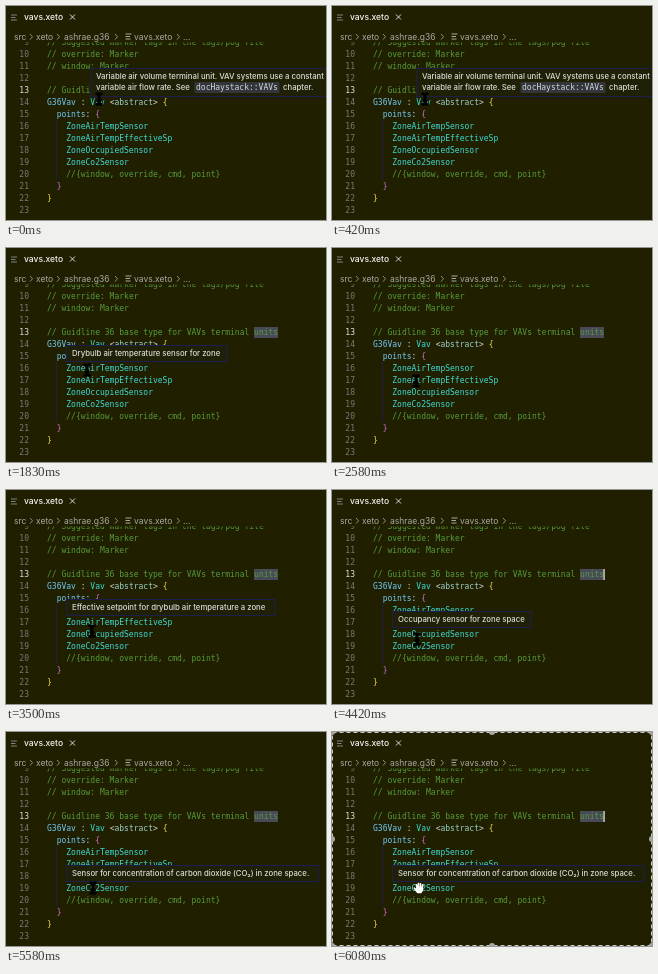
Write an HTML page that moves like this. It is 320x214 px and loops after 6160 ms.

```html
<!DOCTYPE html>
<html lang="en">
<head>
<meta charset="utf-8">
<title>Hovering types in an editor</title>
<style>
  html, body { margin: 0; width: 100%; height: 100%; overflow: hidden; background: #202000; }
  svg { display: block; width: 100vw; height: 100vh; }
  text { white-space: pre; }
  .code { font: 8px "DejaVu Sans Mono", monospace; }
  .ui { font: 8.5px Inter, sans-serif; fill: #a8a8a4; }
  .tip { font: 500 7.75px Inter, sans-serif; fill: #dcdcd8; }
  .box { fill: #202006; stroke: #1e1e4c; stroke-width: 1; }
</style>
</head>
<body>
<svg id="stage" viewBox="0 0 320 214">
  <defs><clipPath id="editor"><rect y="36.5" width="320" height="178"/></clipPath></defs>
  <rect width="320" height="214" fill="#202000"/>
  <g id="lines" clip-path="url(#editor)"></g>
  <rect id="caret" x="271.5" y="79" width="1.2" height="11" fill="#e8e8e8"/>
  <g id="header">
    <path d="M5 9h6M5 11.5h4.5M5 14h6" stroke="#7c8080"/>
    <path d="M64 8.5l5 5m0-5l-5 5" stroke="#d8d8d8"/>
    <path d="M119.5 28h6M119.5 30.5h4.5M119.5 33h5" stroke="#a8a8a4"/>
    <path id="chevrons" fill="none" stroke="#a8a8a4" stroke-width=".8"/>
  </g>
  <g id="tips"></g>
  <g id="selection">
    <rect x=".5" y=".5" width="319" height="213" fill="none" stroke="#c8c8c0" stroke-dasharray="4 3"/>
    <g id="handles" fill="#a8a8a4"></g>
  </g>
  <g id="mouse">
    <g id="beam" fill="none" stroke-linecap="round">
      <path id="beamShape" d="M-2.3-5.3Q0-5.3 0-3.8Q0-5.3 2.3-5.3M0-4V4M-2.3 5.3Q0 5.3 0 3.8Q0 5.3 2.3 5.3M-1.2 1.5h2.4" stroke="#000" stroke-width="2.6"/>
      <use href="#beamShape" style="stroke:#fff;stroke-width:1.2"/>
    </g>
    <g id="hand" fill="#fff" stroke="#fff" stroke-width="1.7" stroke-linecap="round" stroke-linejoin="round">
      <path d="M-2.6-3.2L-1.8 0M-.6-4.4V0M1.5-4.2V0M3.7-2.8L3 1M-4.6 .2L-2.4 3"/>
      <path d="M-2.2 0H3.2V2.4L2 4.4H-1.4L-2.8 2Z"/>
    </g>
  </g>
</svg>
<script>
const LOOP = 6160, LEFT = 41, CHAR = 4.816, LINE = 12;
const SELECT_AT = 5750;
const comment = "#579a3c", type = "#3fd9d2", prop = "#72c8f4", plain = "#d4d4d0",
      outer = "#f8dc48", inner = "#cf70cc", meta = "#9ccfc8";
const $ = id => document.getElementById(id);
const baseline = line => 51 + (line - 10) * LINE;

function add(parent, tag, attrs, content = "") {
  const node = document.createElementNS("http://www.w3.org/2000/svg", tag);
  for (const key in attrs) node.setAttribute(key, attrs[key]);
  node.textContent = content;
  return parent.appendChild(node);
}

// Each line: indent in characters, then text and colour pairs.
const source = {
  9: [0, "// Suggested marker tags in the tags/pog file", comment],
  10: [0, "// override: Marker", comment],
  11: [0, "// window: Marker", comment],
  12: [0],
  13: [0, "// Guidline 36 base type for VAVs terminal units", comment],
  14: [0, "G36Vav", prop, " : ", plain, "Vav", type, " <", plain, "abstract", meta, "> ", plain, "{", outer],
  15: [2, "points", prop, ": ", plain, "{", inner],
  16: [4, "ZoneAirTempSensor", type],
  17: [4, "ZoneAirTempEffectiveSp", type],
  18: [4, "ZoneOccupiedSensor", type],
  19: [4, "ZoneCo2Sensor", type],
  20: [4, "//{window, override, cmd, point}", comment],
  21: [2, "}", inner],
  22: [0, "}", outer],
  23: [0]
};

add($("lines"), "rect", { x: 248, y: 79, width: 24, height: 11, fill: "#484a58" });
add($("lines"), "path", { d: "M50.5 114V174", stroke: "#1e1e48" });
for (const [key, [indent, ...parts]] of Object.entries(source)) {
  const y = baseline(+key);
  add($("lines"), "text", { x: 23, y, class: "code", "text-anchor": "end",
    fill: key === "13" ? "#e0e0e0" : "#767a74" }, key);
  const row = add($("lines"), "text", { x: LEFT + indent * CHAR, y, class: "code" });
  for (let i = 0; i < parts.length; i += 2) add(row, "tspan", { fill: parts[i + 1] }, parts[i]);
}

add($("header"), "text", { x: 18, y: 14, class: "ui", style: "fill:#f4f4f4;font-weight:500" }, "vavs.xeto");
const crumbs = [[8, "src"], [30, "xeto"], [58, "ashrae.g36"], [128, "vavs.xeto"], [177, "..."]];
for (const [x, label] of crumbs) add($("header"), "text", { x, y: 33.7, class: "ui" }, label);
$("chevrons").setAttribute("d", [24, 51, 109, 171].map(x => `M${x} 28l2.5 2.8l-2.5 2.8`).join(""));
for (const cx of [0, 160, 320])
  for (const cy of [0, 107, 214])
    if (cx !== 160 || cy !== 107) add($("handles"), "circle", { cx, cy, r: 3 });

function addTip(from, to, x, y, width, height, label) {
  const node = add($("tips"), "g", {});
  add(node, "rect", { x, y, width, height, class: "box" });
  add(node, "text", { x: x + 5.5, y: y + 10.7, class: "tip" }, label);
  return { from, to, node };
}

const tips = [
  addTip(0, 1250, 84.5, 62.5, 240, 28, "Variable air volume terminal unit. VAV systems use a constant"),
  addTip(1580, 2420, 60.5, 97.5, 161, 16, "Drybulb air temperature sensor for zone"),
  addTip(2660, 3580, 60.5, 109.5, 209, 16, "Effective setpoint for drybulb air temperature a zone"),
  addTip(3750, 4580, 60.5, 121.5, 139, 16, "Occupancy sensor for zone space"),
  addTip(4830, LOOP, 60.5, 133.5, 252, 16, "Sensor for concentration of carbon dioxide (CO₂) in zone space.")
];
const first = tips[0].node;
add(first, "rect", { x: 188.5, y: 76, width: 85, height: 11, rx: 1, fill: "#32363a" });
add(first, "text", { x: 90, y: 84.3, class: "tip" }, "variable air flow rate. See");
add(first, "text", { x: 190, y: 84.3, class: "code", fill: "#d4d8dc" }, "docHaystack::VAVs");
add(first, "text", { x: 277, y: 84.3, class: "tip" }, "chapter.");

// Pointer stops: time, x, y.
const path = [[0, 93, 93], [1170, 93, 93], [1420, 81, 122], [2330, 81, 122], [2580, 84, 133],
  [3400, 84, 133], [3500, 86, 141], [3670, 85, 149], [4420, 85, 149], [4670, 87, 156], [LOOP, 87, 156]];

function pointerAt(t) {
  const i = path.findIndex(stop => stop[0] > t);
  const [t0, x0, y0] = path[i - 1], [t1, x1, y1] = path[i];
  const u = (t - t0) / (t1 - t0);
  return [x0 + (x1 - x0) * u, y0 + (y1 - y0) * u];
}

const show = (node, visible) => node.setAttribute("visibility", visible ? "visible" : "hidden");

function draw(now) {
  const t = now % LOOP, selecting = t >= SELECT_AT;
  for (const { from, to, node } of tips) show(node, t >= from && t < to);
  show($("caret"), t % 1000 < 500);
  show($("selection"), selecting);
  show($("hand"), selecting);
  show($("beam"), !selecting);
  $("mouse").setAttribute("transform", `translate(${pointerAt(t)})`);
}

const start = performance.now();
function frame() {
  draw(performance.now() - start);
  requestAnimationFrame(frame);
}
frame();
</script>
</body>
</html>
```
